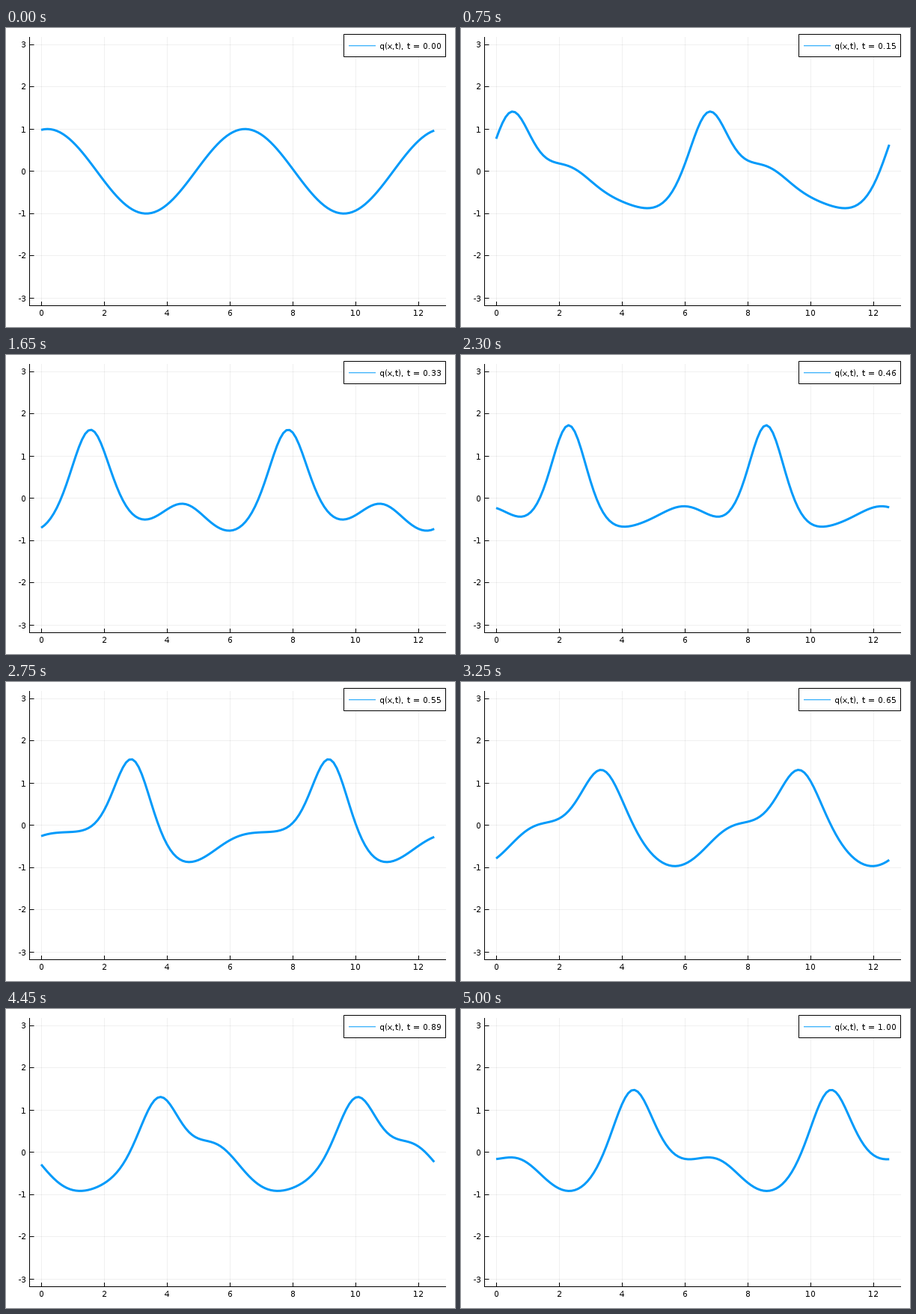
A matplotlib script that plays this animation: 600 px wide and 400 px high, repeating every 5050 ms.

```python
import numpy as np
import matplotlib.pyplot as plt
from matplotlib.animation import FuncAnimation
from matplotlib.patches import Rectangle

W, H, DPI = 600, 400, 100
FRAMES, INTERVAL, DT = 101, 50, 0.01
PX = 72 / DPI                      # one pixel in points
BLUE = "#009AFA"
LEFT, RIGHT, TOP, BOTTOM = 31.25, 588, 11.9, 371.5
X_LIM, Y_LIM = (-0.375, 12.875), (-3.18, 3.18)
DRIFT, PHASE = 4.542, 0.2          # speed of the moving frame, initial offset

# whole-pixel glyph advances
plt.rcParams.update({"text.hinting": "default", "text.hinting_factor": 1,
                     "font.family": "DejaVu Sans", "font.size": 8})


def to_x(x):
    return LEFT + (x - X_LIM[0]) / (X_LIM[1] - X_LIM[0]) * (RIGHT - LEFT)


def to_y(y):
    return BOTTOM - (y - Y_LIM[0]) / (Y_LIM[1] - Y_LIM[0]) * (BOTTOM - TOP)


def mid(v):
    """Centre of the pixel that holds v."""
    return np.floor(v) + 0.5


def solve_kdv(n=64, substeps=50):
    """Fourier modes of q_t = 6 q q_x + q_xxx from q = cos(x), per frame."""
    k = np.arange(n // 2 + 1)
    keep = k <= n // 3
    h = DT / substeps
    half = np.exp(-0.5j * k**3 * h)
    full = half**2

    def slope(v):
        return 3j * k * keep * np.fft.rfft(np.fft.irfft(v, n)**2)

    v = np.fft.rfft(np.cos(2 * np.pi * np.arange(n) / n))
    states = [v]
    for _ in range(FRAMES - 1):
        for _ in range(substeps):
            a = h * slope(v)
            b = h * slope(half * (v + a / 2))
            c = h * slope(half * v + b / 2)
            d = h * slope(full * v + half * c)
            v = full * v + (full * a + 2 * half * (b + c) + d) / 6
        states.append(v)
    return k, np.array(states) * 2 / n


k, modes = solve_kdv()
xs = np.linspace(0, 12.5, 126)

fig = plt.figure(figsize=(W / DPI, H / DPI), dpi=DPI, facecolor="white")
ax = fig.add_axes([0, 0, 1, 1])
ax.set_xlim(0, W)
ax.set_ylim(H, 0)
ax.axis("off")


def line(x, y, width=1.0, color="black", **kw):
    return ax.plot(x, y, lw=width * PX, color=color, snap=False,
                   solid_capstyle="butt", **kw)[0]


def label(x, y, s, **kw):
    return ax.text(x, y, s, va="baseline", **kw)


for v in range(0, 13, 2):
    x = mid(to_x(v))
    line([x, x], [12, 371], alpha=0.06, zorder=1)
    line([x, x], [366, 371], zorder=3)
    label(to_x(v), 385, str(v), ha="center")
for v in range(-3, 4):
    y = mid(to_y(v))
    line([32, RIGHT], [y, y], alpha=0.06, zorder=1)
    line([32, 37.5], [y, y], zorder=3)
    label(26.6, y + 4, str(v), ha="right")
line([mid(LEFT)] * 2, [12, 372], zorder=3)
line([31, RIGHT], [mid(BOTTOM)] * 2, zorder=3)

curve = line([], [], 3, BLUE, solid_joinstyle="round", zorder=4)

ax.add_patch(Rectangle((451.5, 8.5), 136, 30, facecolor="white",
                       edgecolor="black", lw=PX, snap=False, zorder=5))
line([458, 494], [23.75, 23.75], 1, BLUE, zorder=6)
caption = label(499, 28, "", zorder=6)


def update(i):
    t = i * DT
    theta = xs - PHASE - DRIFT * t
    q = (np.exp(1j * np.outer(theta, k)) @ modes[i]).real
    curve.set_data(to_x(xs), to_y(q))
    caption.set_text(f"q(x,t), t = {t:.2f}")
    return curve, caption


anim = FuncAnimation(fig, update, frames=FRAMES, interval=INTERVAL,
                     init_func=lambda: update(0), repeat=True, repeat_delay=0)
plt.show()
```
